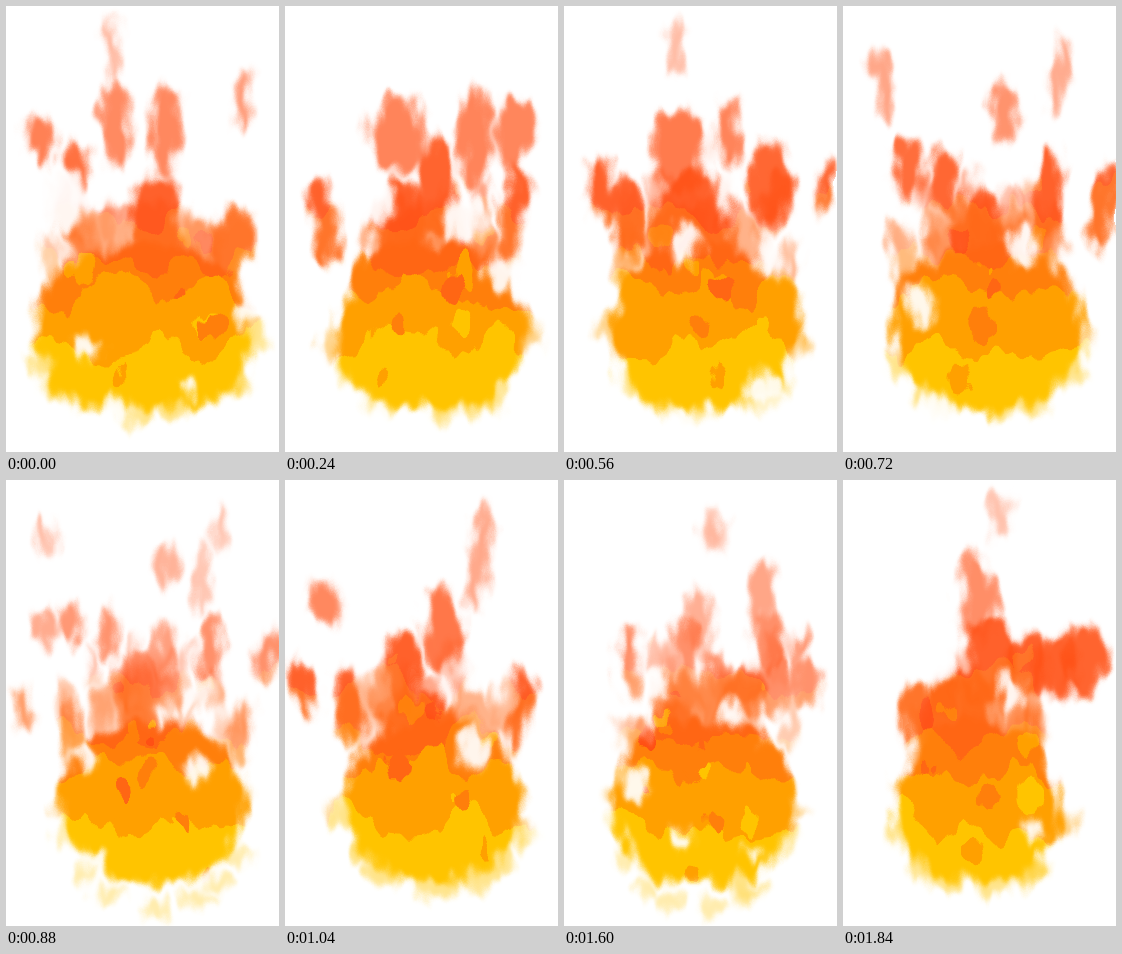
Recreate the animation shown at these times as an HTML page with a canvas. Size 273 by 446 pixels, loop 1920 ms.

```html
<!DOCTYPE html>
<html lang="en">
<head>
<meta charset="utf-8">
<title>Flame</title>
<style>
html, body { margin: 0; width: 100%; height: 100%; overflow: hidden; background: #fff; }
canvas { display: block; filter: url(#ragged); }
svg { position: absolute; }
</style>
</head>
<body>
<canvas id="stage" width="273" height="446"></canvas>
<svg width="0" height="0">
  <filter id="ragged" filterUnits="userSpaceOnUse" x="0" y="0" width="273" height="446" color-interpolation-filters="sRGB">
    <feTurbulence id="noise" type="fractalNoise" baseFrequency=".06 .03" numOctaves="2" result="n"/>
    <feDisplacementMap in="SourceGraphic" in2="n" scale="28" xChannelSelector="R" yChannelSelector="G"/>
  </filter>
</svg>
<script>
const W = 273, H = 446, STEP = 80, FRAMES = 24, RISE = 45;
const COLOURS = ['#ff5014', '#ff6614', '#ff7f0b', '#ffa000', '#ffc400'];
const LEVELS = [205, 255, 288, 342]; // mean heights of the colour borders

function seeded(seed) {
  return (lo, hi) => {
    const v = Math.sin(++seed * 12.9898) * 43758.5453;
    return lo + (hi - lo) * (v - Math.floor(v));
  };
}

const range = (n, f) => Array.from({ length: n }, (_, i) => f(i));

// A pose: bowl centre and half width, tongues (x, y, rx, ry) and holes (x, y, r).
function pose(at, cx, half, tongues, holes) {
  const rnd = seeded(at * 100 + 7);
  const shape = (x, y, rx, ry, opacity) => ({ x, y, rx, ry, opacity, tilt: (x - 140) * .0014 });

  const bowl = range(16, i => {
    const a = i * Math.PI / 8, c = Math.cos(a);
    const r = rnd(.95, 1.05);
    return [cx + half * r * Math.sign(c) * Math.abs(c) ** .75, 322 + 82 * r * Math.sin(a)];
  }).flat();

  const haze = range(12, () => shape(cx + rnd(-.95, .95) * half, rnd(185, 275), rnd(6, 15), rnd(20, 38), rnd(.3, .55)));
  const rim = range(7, i => {
    const a = Math.PI * (i + rnd(0, 1)) / 7;
    return shape(cx + half * Math.cos(a), 325 + 80 * Math.sin(a), rnd(12, 22), rnd(11, 17), .45);
  });
  const main = range(tongues.length / 4, i => {
    const [x, y, rx, ry] = tongues.slice(i * 4);
    return shape(x, y, rx, ry, Math.min(.9, .22 + y / 270));
  });

  return {
    at, bowl,
    wisps: [shape(cx, 245, half * .72, 48, .5), ...haze, ...rim, ...main],
    holes: range(holes.length / 3, i => {
      const [x, y, r] = holes.slice(i * 3);
      return shape(x, y, r, r * (y < 320 ? 1.45 : 1), .92);
    }),
    bands: LEVELS.map(y => range(8, () => y + rnd(-22, 22))),
    patches: range(8, i => {
      const k = i % 4, side = i < 4 ? 1 : 0;
      const r = rnd(4, 12);
      const p = shape(cx + rnd(-.7, .7) * half, LEVELS[k] + (side ? -25 : 30), r, r * rnd(1, 1.6), 1);
      return { ...p, colour: COLOURS[k + side] };
    })
  };
}

const poses = [
  pose(0, 138, 108,
    [110,122,15,42, 106,45,7,36, 70,160,12,25, 35,135,12,26, 160,125,14,45, 150,220,26,50, 228,235,22,32, 238,92,8,30],
    [118,182,13, 52,190,24, 235,312,9, 80,343,12, 108,405,14, 184,383,9]),
  pose(3, 145, 93,
    [113,130,28,38, 190,130,16,50, 230,128,20,34, 228,205,11,50, 38,215,13,42, 115,220,26,45, 150,180,16,50],
    [90,195,16, 180,212,19, 213,268,12, 96,408,11]),
  pose(7, 140, 92,
    [115,145,28,42, 165,130,12,36, 112,42,9,30, 205,175,22,40, 38,185,13,32, 65,210,14,38, 262,180,8,30, 130,220,40,55],
    [161,180,13, 121,240,14, 207,248,16, 197,383,17, 122,413,11, 33,342,9]),
  pose(9, 144, 92,
    [40,78,11,34, 65,165,16,32, 102,175,14,36, 160,108,13,34, 216,70,9,38, 205,190,14,48, 262,200,13,42, 135,230,28,45],
    [178,240,15, 77,300,13, 40,245,7, 93,404,17]),
  pose(13, 150, 88,
    [40,125,15,24, 195,75,9,58, 158,150,18,42, 118,190,18,45, 18,205,11,30, 65,225,14,40, 235,230,11,42, 135,250,38,35],
    [160,212,10, 190,270,14, 249,361,10]),
  pose(17, 144, 97,
    [197,135,18,42, 206,185,22,42, 148,70,10,34, 122,190,17,42, 65,205,14,50, 235,190,8,24, 110,240,32,35, 185,235,32,35],
    [72,325,20, 118,382,14, 138,212,12, 28,295,10]),
  pose(23, 135, 81,
    [135,115,18,45, 150,185,28,44, 182,185,20,30, 212,185,22,34, 242,180,20,36, 75,235,16,32, 155,35,9,26, 115,235,30,48],
    [92,183,16, 167,213,13, 207,222,9, 190,350,10, 246,235,11])
];

const ctx = stage.getContext('2d');
const maskCanvas = document.createElement('canvas');
maskCanvas.width = W;
maskCanvas.height = H;
const mask = maskCanvas.getContext('2d');

const mix = (a, b, u) => a.map((v, i) => v + (b[i] - v) * u);

// Closed Catmull-Rom curve through x, y pairs.
function blob(c, p) {
  const n = p.length, at = i => p[(i + n) % n];
  c.beginPath();
  c.moveTo(p[0], p[1]);
  for (let i = 0; i < n; i += 2) {
    const near = k => at(i + k) + (at(i + k + 2) - at(i + k - 2)) / 6;
    const far = k => at(i + k + 2) - (at(i + k + 4) - at(i + k)) / 6;
    c.bezierCurveTo(near(0), near(1), far(0), far(1), at(i + 2), at(i + 3));
  }
  c.fill();
}

function ellipse(c, p, size, dy) {
  c.beginPath();
  c.ellipse(p.x, p.y + dy, p.rx * size, p.ry * size, p.tilt, 0, 2 * Math.PI);
  c.fill();
}

// Parts of one pose rise and shrink while those of the next grow from below.
function parts(a, b, u, key, paint) {
  for (const p of a[key]) paint(p, Math.sqrt(1 - u), -RISE * u);
  if (u) for (const p of b[key]) paint(p, Math.sqrt(u), RISE * (1 - u));
}

function drawMask(a, b, u) {
  mask.globalCompositeOperation = 'source-over';
  mask.clearRect(0, 0, W, H);
  parts(a, b, u, 'wisps', (p, s, dy) => {
    mask.globalAlpha = p.opacity * s;
    ellipse(mask, p, s, dy);
  });
  mask.globalAlpha = 1;
  blob(mask, mix(a.bowl, b.bowl, u));
  mask.globalCompositeOperation = 'destination-out';
  parts(a, b, u, 'holes', (p, s, dy) => {
    mask.globalAlpha = p.opacity;
    ellipse(mask, p, s, dy);
  });
  mask.globalAlpha = 1;
}

function draw(frame) {
  const i = poses.findLastIndex(p => p.at <= frame);
  const a = poses[i], b = poses[(i + 1) % poses.length];
  const u = (frame - a.at) / ((b.at || FRAMES) - a.at);
  drawMask(a, b, u);

  ctx.globalCompositeOperation = 'source-over';
  ctx.fillStyle = COLOURS[0];
  ctx.fillRect(0, 0, W, H);
  a.bands.forEach((band, k) => {
    const ys = mix(band, b.bands[k], u);
    ctx.fillStyle = COLOURS[k + 1];
    blob(ctx, [-30, ys[0], ...ys.flatMap((y, j) => [30 + j * 30, y]), 300, ys[7], 300, 500, -30, 500]);
  });
  parts(a, b, u, 'patches', (p, s, dy) => {
    ctx.fillStyle = p.colour;
    ellipse(ctx, p, s, dy);
  });

  ctx.globalCompositeOperation = 'destination-in';
  ctx.filter = 'blur(3.5px)';
  ctx.drawImage(maskCanvas, 0, 0);
  ctx.filter = 'none';
  noise.setAttribute('seed', frame + 1);
}

let shown = -1;
function tick() {
  const frame = Math.floor(performance.now() / STEP) % FRAMES;
  if (frame !== shown) draw(shown = frame);
  requestAnimationFrame(tick);
}
tick();
</script>
</body>
</html>
```
